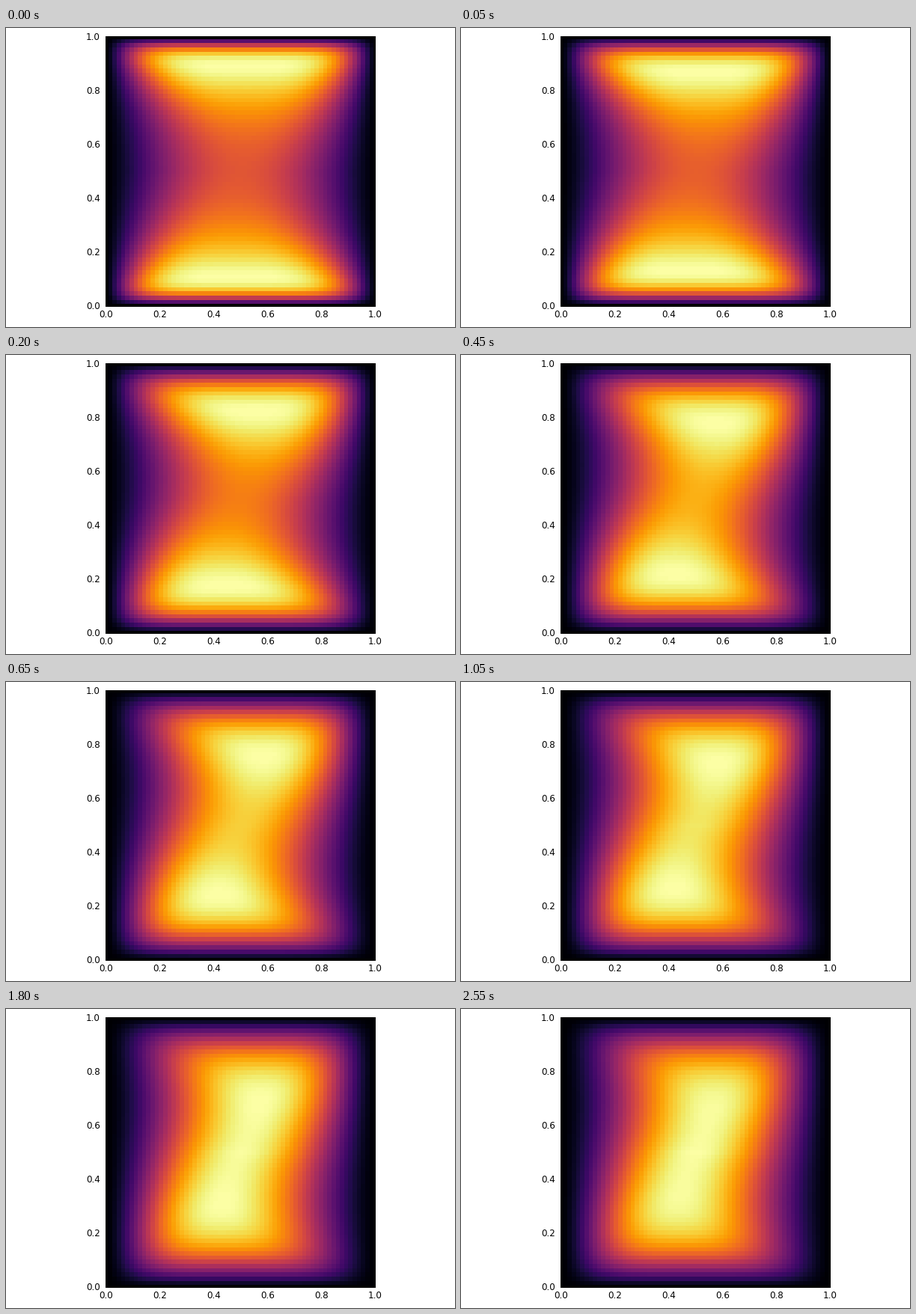
A matplotlib script that plays this animation: 600 px wide and 400 px high, repeating every 8 s.

```python
import numpy as np
import matplotlib.pyplot as plt
from matplotlib.animation import FuncAnimation

W, H, DPI = 600, 400, 100
LEFT, RIGHT, TOP, BOTTOM = 133.7, 493.3, 12.2, 371.8
CELLS = 64
STEP_MS, LOOP_MS, REST_MS = 50, 8000, 2550
SETTLE_MS = 430

x = np.linspace(0, 1, CELLS + 1)
# Distance from the top wall, upper half only.
depth = np.linspace(0.5, 0, CELLS // 2 + 1)[:, None]


def field(ms):
    u = ms / SETTLE_MS
    fade = np.exp(-u)

    # Wall layer thickens while the bright ends sink towards the middle.
    layer = 0.24 - 0.18 * fade
    saddle = 3.8 + (1 + 5 * u) * fade
    height = np.tanh(depth / layer) ** 1.2 * (1 + saddle * (0.5 - depth) ** 2)

    # Rows are sheared sideways, and flatter the closer they lie to the wall.
    shear = 0.068 + (0.078 * u - 0.043) * fade
    bent = x - shear * np.sin(2 * np.pi * depth) * np.sin(np.pi * x)
    wave = np.clip(np.sin(np.pi * bent), 0, 1) ** (1.5 - 0.2 * fade)
    flatness = 1 + (3.2 + 0.8 * fade) * np.exp(-depth / (0.1 + 0.03 * fade))
    upper = height * (1 - (1 - wave) ** flatness)

    # The lower half is the upper half turned by 180 degrees.
    full = np.vstack([upper[:0:-1, ::-1], upper])
    return full / full.max()


def redraw_times():
    """Pauses between redraws grow as the field settles."""
    times, t = [], 0
    while t < REST_MS:
        times.append(t)
        t += STEP_MS * max(1, t // 225)
    return np.array(times + [REST_MS])


def label(px, py, text, align):
    fig.text(px / W, 1 - py / H, text, ha=align, va="baseline",
             family="DejaVu Sans", size=8.6, color="black")


fig = plt.figure(figsize=(W / DPI, H / DPI), dpi=DPI, facecolor="white")
ax = fig.add_axes([LEFT / W, 1 - BOTTOM / H,
                   (RIGHT - LEFT) / W, (BOTTOM - TOP) / H])
half = 0.5 / CELLS
image = ax.imshow(field(0), cmap="inferno", vmin=0, vmax=1, origin="lower",
                  extent=[-half, 1 + half, -half, 1 + half],
                  interpolation="nearest", aspect="auto")
ax.set(xlim=(0, 1), ylim=(0, 1), xticks=[], yticks=[])
for spine in ax.spines.values():
    spine.set_linewidth(2 * 72 / DPI)

for v in np.linspace(0, 1, 6):
    label(LEFT + v * (RIGHT - LEFT), 387, f"{v:.1f}", "center")
    label(126, BOTTOM - v * (BOTTOM - TOP) + 4, f"{v:.1f}", "right")

times = redraw_times()


def update(frame):
    image.set_data(field(times[times <= frame * STEP_MS][-1]))
    return (image,)


anim = FuncAnimation(fig, update, frames=LOOP_MS // STEP_MS,
                     interval=STEP_MS, repeat=True, repeat_delay=0)
plt.show()
```
